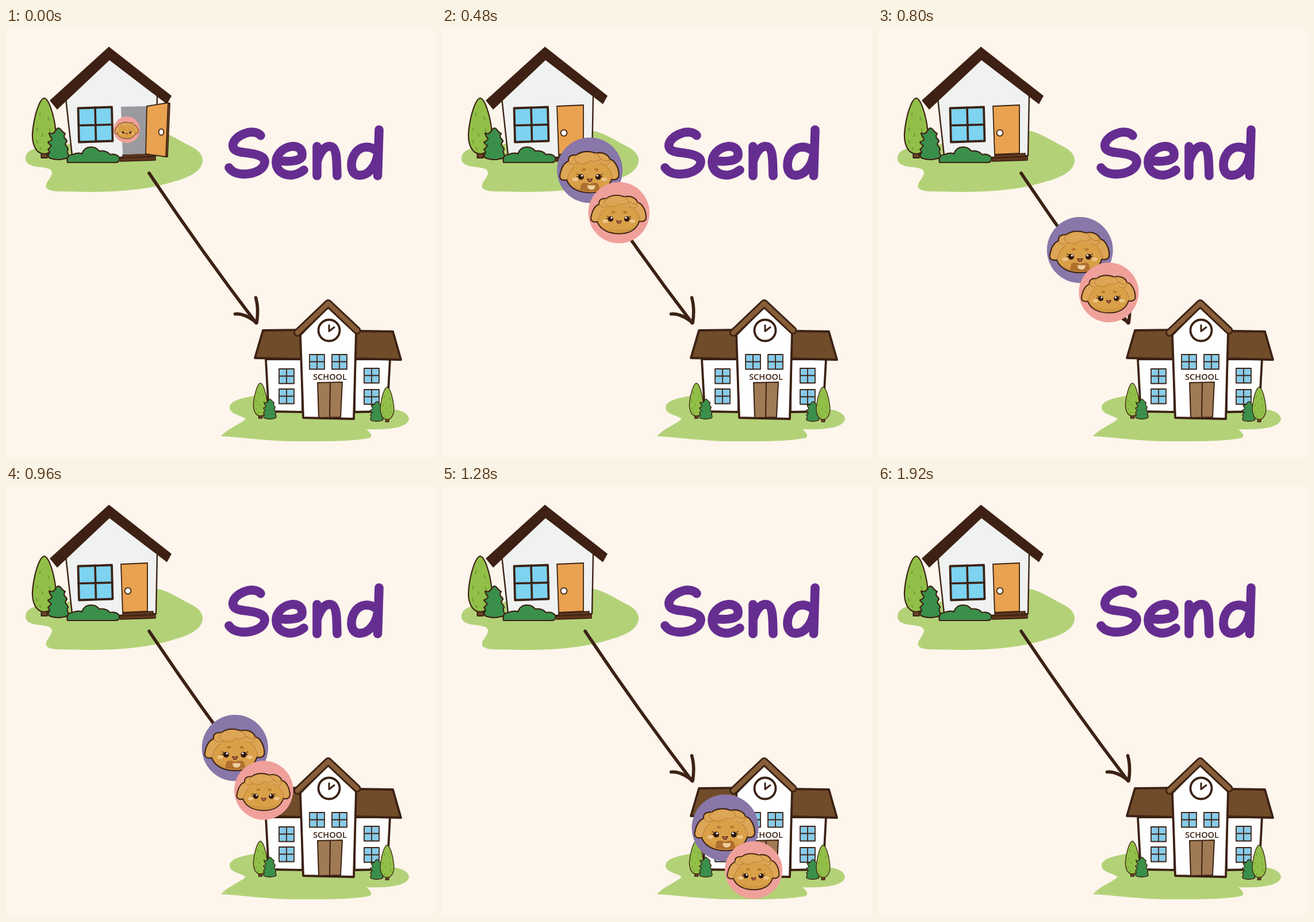
An HTML page for the animation above (2160 ms loop, 748 px wide and 748 px high).

```html
<!DOCTYPE html>
<html lang="en">
<head>
<meta charset="utf-8">
<title>Send</title>
<style>
  html, body { margin: 0; width: 100%; height: 100%; overflow: hidden; background: #fef5ec; }
  svg { display: block; width: 100vw; height: 100vh; }
  .line { stroke: #3c2214; stroke-linejoin: round; stroke-linecap: round; }
  .bare { fill: none; }
</style>
</head>
<body>
<svg viewBox="0 0 748 748">
  <defs>
    <!-- both plants stand on the origin -->
    <g id="tree" class="line" stroke-width="2.2">
      <path fill="#6b4526" d="M-5-10H6L5 0H-5Z"/>
      <path fill="#92bf48" d="M0-104C8-103 17-75 20-48C23-24 14-7 0-7C-14-7-23-24-20-48C-17-75-8-103 0-104Z"/>
      <path class="bare" stroke-width="2.6" style="stroke:#76a336" d="M-7-78l-1 4M7-70l1 4M-12-52l-1 4M9-50l1 4M-3-42l0 4M-13-30l1 4M11-30l-1 4M-7-18l1 3"/>
    </g>
    <path id="fir" class="line" stroke-width="2.2" fill="#3a8f4a"
      d="M-4-51Q0-58 5-51Q9-46 12-45Q9-41 11-37Q15-34 15-31Q11-28 13-24Q17-20 17-17Q14-14 17-9Q20-2 10-1Q0 2-11-1Q-20-3-17-9Q-13-13-18-17Q-14-21-12-24Q-17-27-18-30Q-11-33-11-36Q-15-40-16-46Q-9-42-4-51Z"/>
    <g id="face">
      <path class="line" stroke-width="2" fill="#d9a048"
        d="M-38 16C-46 18-51 14-49 7C-47-4-43-12-35-15C-36-23-30-26-22-25C-16-31-2-33 10-28C20-31 31-26 33-18C42-17 48-2 48 8C48 14 42 17 36 15C31 30 18 37 0 37C-18 37-33 30-38 16Z"/>
      <path fill="#dda556" d="M-34-13C-35-22-29-24-21-23C-15-29-2-31 10-26C19-29 30-24 32-16C41-15 46-1 46 8C46 13 42 14 37 12C35 1 30-6 21-9C11-12 5-14-3-14C-17-15-28-7-32 1C-35 8-34 15-39 14C-45 15-49 12-47 7C-45-2-42-10-34-13Z"/>
      <path fill="none" stroke="#c18438" stroke-width="1.2" stroke-linecap="round"
        d="M-35-14C-29-8-24-9-18-12C-26-15-28-18-22-25M-18-12C-8-8-3-11 0-16C8-13 15-15 18-19C15-24 13-26 10-28M18-19C25-14 30-14 33-18M18-12C24-6 31-7 33-17M-37 14C-34 4-31-2-25-6M37 14C36 4 32-2 27-6"/>
      <path fill="#cb8f3c" opacity=".5" d="M-32 23C-17 32 17 32 32 22C24 34 12 36 0 36C-14 36-25 32-32 23Z"/>
      <g fill="#b97631"><ellipse cx="-10" cy="-1" rx="3.600" ry="2" transform="rotate(-10 -10 -1)"/><ellipse cx="11" cy="-1" rx="3.600" ry="2" transform="rotate(10 11 -1)"/></g>
      <g fill="#ecc489"><ellipse cx="-24" cy="15" rx="5" ry="3"/><ellipse cx="24" cy="15" rx="5" ry="3"/></g>
      <g fill="#2f1710"><circle cx="-14.500" cy="11" r="4.700"/><circle cx="14" cy="11" r="4.700"/></g>
      <path class="line bare" stroke-width="1.100" d="M-18 8l-3-2M-19 11l-3-1M18 8l3-2M18 11l3-1"/>
      <g fill="#fff"><circle cx="-13" cy="9" r="1.600"/><circle cx="12.500" cy="9" r="1.600"/></g>
      <path class="line" stroke-width="1.100" fill="#d8605f" d="M-4 14Q0 16 4 14Q3 19 0 19Q-3 19-4 14Z"/>
    </g>
  </defs>

  <rect width="748" height="748" fill="#fef5ec"/>

  <g id="home">
    <path fill="#b3d278" d="M34 226C35 212 52 207 70 208L250 177C275 177 300 195 322 206C336 213 343 222 342 232C340 251 315 261 289 268C245 282 190 286 130 285C100 284 78 286 71 279C65 271 79 262 80 252C80 243 66 243 52 241C40 239 33 234 34 226Z"/>
    <use href="#tree" x="66.500" y="226"/>
    <use href="#fir" x="91" y="228.500"/>
    <path fill="#f0f2f1" d="M104 122L180 54L263 118L261 224L115 227Z"/>
    <path class="line bare" stroke-width="2.400" d="M104 122L115 222M263 118L261 222L199 225"/>
    <path fill="#3e2114" d="M76 126L179 32.500L288 118L280 132.500L180 56L89 142Z"/>
    <path class="line" stroke-width="3.800" fill="#7dd3f0" d="M125.500 139.500L184 137.500L185.500 196.500L127 198.500Z"/>
    <path class="line bare" stroke-width="3.600" d="M155 138L156.500 197.500M126 169.500L185 168"/>
    <path class="line" stroke-width="2.200" fill="#3a8f4a" d="M107 234Q104 221 116 220Q126 216 132 219Q136 207 148 207Q157 207 162 214Q174 212 181 220Q192 218 197 225Q199 234 190 234Z"/>
    <path class="line" stroke-width="1.600" fill="#5f371d" d="M203 221L256 218V224L203 226ZM199 226L260 223V230L199 232Z"/>
    <g id="closed" class="line" stroke-width="1.800">
      <path fill="#e9a24f" d="M200 136L246 134V218L203 220Z"/>
      <circle cx="212" cy="182.500" r="5.400" fill="#fff"/>
    </g>
    <g id="open" class="line" stroke-width="1.800">
      <path fill="#9a9b9f" stroke="none" d="M200 137L245 136V219L203 220Z"/>
      <path fill="#7a4a25" d="M281 131L285 131L281 224L277 224Z"/>
      <path fill="#e9a24f" d="M245 136L282 130L278 224L243 219Z"/>
      <ellipse cx="270" cy="181" rx="4.300" ry="5.400" fill="#fff"/>
    </g>
  </g>

  <g class="line bare" stroke-width="5.600">
    <path d="M249 252.500Q339 387 435 513"/>
    <path d="M434.500 469Q440 489 436 513Q416 496 398.500 497.500"/>
  </g>

  <g role="img" aria-label="Send" fill="none" stroke="#662d91" stroke-width="15.600" stroke-linecap="round" stroke-linejoin="round">
    <path d="M443 187C437 180 425 180 417 183C402 188 393 198 395 207C397 216 412 216 424 218C440 220 451 225 450 234C448 248 428 255 410 254C400 253 392 249 388 243"/>
    <path d="M476 231C492 233 515 232 515 221C516 210 507 205 497 206C480 208 469 222 470 235C471 250 484 256 496 256C506 255 513 251 518 247"/>
    <path d="M541 206V257M541 233C546 215 555 205 564 206C577 207 575 235 576 257"/>
    <path d="M649 177L646.500 257M645 214C633 204 617 205 608 217C598 231 598 254 613 256C630 258 643 240 646 223"/>
  </g>

  <g id="school">
    <path fill="#b3d278" d="M374 710C385 697 406 690 417 680C408 673 389 672 389 660C390 647 412 644 430 640H660L672 664C683 663 700 669 701 680C699 697 660 699 627 698C634 704 638 709 633 713C600 720 545 719 500 719C450 718 410 712 374 710Z"/>
    <g class="line" stroke-width="3.800">
      <path fill="#fff" d="M452 576H515L516 668L457 667ZM607 576H668L663 667L606 668Z"/>
      <path fill="#704c2a" d="M447 526L514 525V576L433 574ZM606 527L673 528L687 577L606 575Z"/>
      <path fill="#fff" d="M512 534L560 485L609 531L605 680L517 678Z"/>
      <path class="bare" stroke-width="14" d="M507 530L560.500 479L610.500 526"/>
      <path class="bare" stroke-width="8" style="stroke:#875e38" d="M507 530L560.500 479L610.500 526"/>
      <circle cx="562" cy="526" r="18.500" fill="#fff"/>
      <path class="bare" stroke-width="3" d="M562 517V527.500L571 520.500"/>
    </g>
    <g id="panes" class="line" stroke-width="1.800"></g>
    <path class="line" stroke-width="2" fill="#a07a54" d="M542 617L585 616L582 677L544 678ZM564 617L563 677"/>
    <text x="563.500" y="612" text-anchor="middle" font-family="'Open Sans', sans-serif" font-size="14.500" font-weight="600" fill="#3c2214">SCHOOL</text>
    <use href="#tree" transform="translate(442.500 679) scale(.59)"/>
    <use href="#fir" transform="translate(459 680) scale(.63)"/>
    <use href="#fir" transform="translate(645 684) scale(.63)"/>
    <use href="#tree" transform="translate(663 685) scale(.58)"/>
  </g>

  <g id="parent">
    <circle r="54" fill="#8877a8"/>
    <use href="#face"/>
    <path fill="#b06f2e" d="M-14 22Q-6 19 0 23Q6 19 14 22L17 33Q0 37-16 33Z"/>
    <path fill="#f0cf9e" d="M-4 25H9Q9 32 2.500 32Q-4 32-4 25Z"/>
  </g>
  <g id="child">
    <circle r="54" fill="#f0a09a"/>
    <use href="#face"/>
  </g>
</svg>
<script>
const STEP = 80, LOOP = 2160, DOOR_CLOSES = 4;
const el = id => document.getElementById(id);

// Keys are [step, x, y, radius]; the last key ends the visible span.
const travellers = [
  { node: el('child'), keys: [[0, 210, 177, 23], [2, 214, 182.6, 54.5], [16, 542, 668, 50],
    [17, 570, 680, 49.5], [22, 573.5, 665, 25.7], [24, 573.5, 665, 25.7]] },
  { node: el('parent'), keys: [[2, 210, 178, 23], [4, 210, 178, 56.8], [16, 492.5, 594.5, 58],
    [18, 539, 664, 58], [20, 550, 681, 38], [21, 564, 689, 29], [22, 573, 668, 20]] }
];

const paneCorners = [[528, 568], [567, 568], [475, 593], [475, 628], [623, 592], [623, 629]];
el('panes').innerHTML = paneCorners.map(([x, y]) =>
  `<path fill="#87cbe9" d="M${x} ${y}h26v25.500h-26ZM${x + 13} ${y}v25.500M${x} ${y + 12.5}h26"/>`).join('');

function poseAt(keys, step) {
  const next = keys.findIndex(key => key[0] > step);
  if (next < 1) return null;
  const a = keys[next - 1], b = keys[next];
  const mix = (step - a[0]) / (b[0] - a[0]);
  return a.map((value, i) => value + (b[i] - value) * mix);
}

function show(node, visible) {
  node.style.display = visible ? '' : 'none';
}

function draw(time) {
  const step = Math.floor((time % LOOP) / STEP);
  show(el('open'), step < DOOR_CLOSES);
  show(el('closed'), step >= DOOR_CLOSES);
  for (const { node, keys } of travellers) {
    const pose = poseAt(keys, step);
    show(node, pose);
    if (pose) node.setAttribute('transform', `translate(${pose[1]} ${pose[2]}) scale(${pose[3] / 54})`);
  }
}

const start = performance.now();
function tick() {
  draw(performance.now() - start);
  requestAnimationFrame(tick);
}
tick();
</script>
</body>
</html>
```
